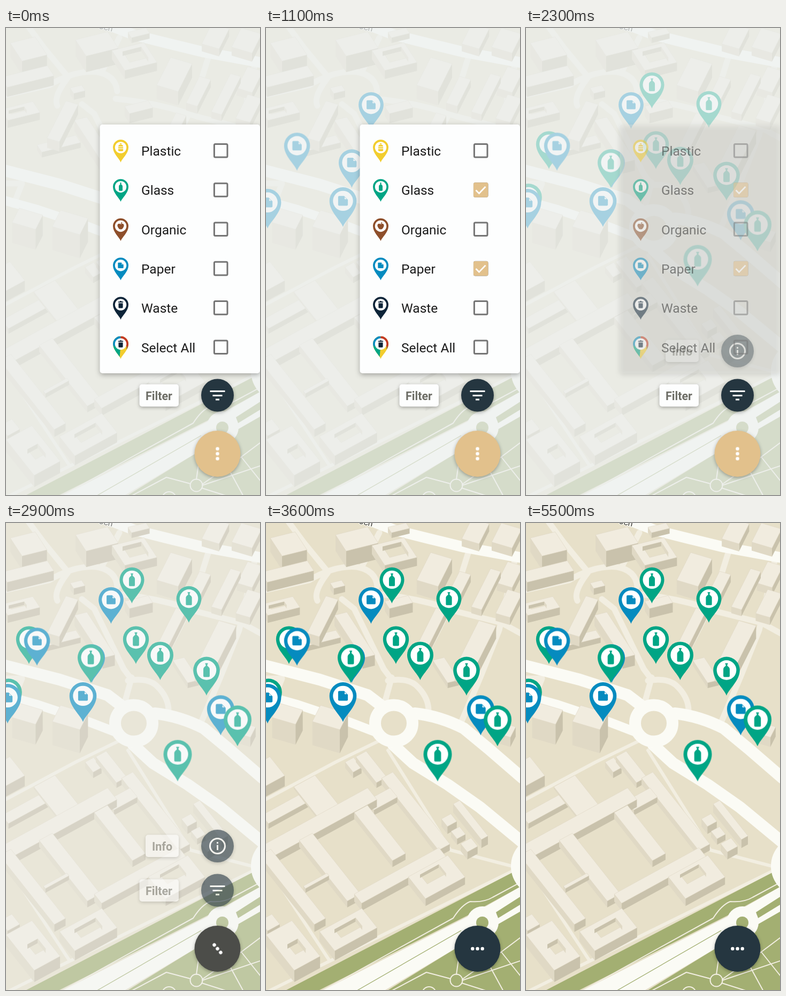
An HTML page that plays this animation: 475x871 px, repeating every 5600 ms.

```html
<!DOCTYPE html>
<html lang="en">
<head>
<meta charset="utf-8">
<title>Map filter menu</title>
<style>
  html, body { margin: 0; width: 100%; height: 100%; overflow: hidden; background: #e7e0c9; }
  svg { display: block; width: 475px; height: 871px; font-family: Roboto, "Liberation Sans", sans-serif; }
  .anim, .anim * { animation-duration: 5600ms; animation-iteration-count: infinite; animation-timing-function: linear; }
  .road { fill: none; stroke-linejoin: round; stroke-linecap: round; }
  .minor { stroke: #f2eee1; }
  .major { stroke: #fbfbf5; }
  .item { font-size: 24.5px; fill: #1c1c1c; }
  .tag { font-size: 21.5px; font-weight: 700; fill: #6d6d66; text-anchor: middle; }
  .raised { filter: drop-shadow(0 2px 3px rgba(0, 0, 0, .3)); }
  .dot { transform-box: view-box; transform-origin: 395.5px 794px; }

  #wash { fill: #ecf0f0; animation-name: wash; }
  @keyframes wash {
    0%, 48.21% { opacity: .7; }
    51.79% { opacity: .38; }
    53.57% { opacity: .21; }
    57.14% { opacity: .07; }
    62.5%, 100% { opacity: 0; }
  }
  #paperPins { animation-name: paperPins; }
  @keyframes paperPins { 0%, 14.29% { opacity: 0; } 17.86%, 100% { opacity: 1; } }
  #glassPins { animation-name: glassPins; }
  @keyframes glassPins { 0%, 21.43% { opacity: 0; } 26.79%, 100% { opacity: 1; } }

  #card { animation-name: card; }
  @keyframes card {
    0%, 37.5% { fill: #fdfefe; opacity: 1; }
    41.07% { fill: #e2e2dd; opacity: .35; }
    44.64%, 100% { fill: #e2e2dd; opacity: 0; }
  }
  #items { animation-name: items; }
  @keyframes items { 0%, 37.5% { opacity: 1; } 41.07% { opacity: .5; } 44.64%, 100% { opacity: 0; } }

  #paperOn, #glassOn { animation-timing-function: step-end; }
  #paperOn { animation-name: paperOn; }
  @keyframes paperOn { 0% { opacity: 0; } 7.14%, 100% { opacity: 1; } }
  #glassOn { animation-name: glassOn; }
  @keyframes glassOn { 0% { opacity: 0; } 14.29%, 100% { opacity: 1; } }

  .ripple { fill: #000; }
  #paperRipple { animation-name: paperRipple; }
  @keyframes paperRipple {
    0%, 3.56% { r: 0px; opacity: 0; }
    3.57% { r: 30px; opacity: .07; }
    7.14% { r: 170px; opacity: .07; }
    10.71%, 100% { r: 230px; opacity: 0; }
  }
  #glassRipple { animation-name: glassRipple; }
  @keyframes glassRipple {
    0%, 10.7% { r: 0px; opacity: 0; }
    10.71% { r: 30px; opacity: .07; }
    12.5% { r: 92.3px; opacity: .07; }
    16.07% { r: 200px; opacity: .05; }
    17.86%, 100% { r: 230px; opacity: 0; }
  }

  #info { animation-name: info; }
  @keyframes info { 0%, 37.5% { opacity: 0; } 41.07% { opacity: .58; } 44.64%, 100% { opacity: 1; } }
  .mini { animation-name: mini; }
  @keyframes mini { 0%, 48.21% { opacity: 1; } 53.57% { opacity: .42; } 57.14%, 100% { opacity: 0; } }
  .label { animation-name: label; }
  @keyframes label { 0%, 48.21% { opacity: 1; } 53.57% { opacity: .3; } 57.14%, 100% { opacity: 0; } }

  #fab { animation-name: fab; }
  @keyframes fab {
    0%, 48.21% { fill: #e2c18c; }
    51.79% { fill: #4c4d49; }
    53.57% { fill: #1b2830; }
    64.29%, 100% { fill: #253640; }
  }
  .dot { animation-name: dots; }
  @keyframes dots {
    0%, 48.21% { transform: rotate(90deg); }
    53.57% { transform: rotate(30deg); }
    57.14%, 100% { transform: rotate(0deg); }
  }
</style>
</head>
<body>
<svg class="anim" viewBox="0 0 475 871">
  <defs>
    <path id="drop" d="M0 48C-4 36-25 20-25 0A25 25 0 1 1 25 0C25 20 4 36 0 48Z"/>
    <clipPath id="dropClip"><use href="#drop"/></clipPath>
    <path id="glass" d="M-2.5-13h5v2h-1v3q4.5 3 4.5 6v13q0 2-2 2h-8q-2 0-2-2v-13q0-3 4.5-6v-3h-1z"/>
    <path id="paper" d="M-9-7q0-2 2-2h9l7 7v9q0 2-2 2h-14q-2 0-2-2zM3-7v4h4z" fill-rule="evenodd"/>
    <path id="waste" d="M-8-10h5l1-2h4l1 2h5v3h-16zM-7-5h14v14q0 2-2 2h-10q-2 0-2-2z"/>
    <path id="organic" d="M0-6c8-5 12 1 10 7s-6 11-10 9c-4 2-8-3-10-9s2-12 10-7zM0-7q0-5 5-6q0 5-5 6z"/>
    <path id="plastic" d="M-3-13h6v3h-6zM-4-9h8q4 2 4 6h-16q0-4 4-6zM-8-1h16v4h-16zM-8 5h16v4q0 3-3 3h-10q-3 0-3-3z"/>
    <clipPath id="glassRow"><rect x="176" y="265" width="299" height="73.4"/></clipPath>
    <clipPath id="paperRow"><rect x="176" y="412" width="299" height="73.4"/></clipPath>
  </defs>

  <rect width="475" height="871" fill="#e7e0c9"/>
  <g class="road minor" stroke-width="11">
    <path d="M40-5L72 38L113 88M-5 126L80 107Q130 78 170 82Q205 88 208 118M96 145Q88 128 116 92M178 84L212 18"/>
    <path d="M142 142L165 160L220 272L235 292M235 288L222 335M228 294Q262 288 280 302Q304 324 304 350"/>
    <path d="M364 374L402 285L436 200L466 66M205 132Q290 140 360 166L440 186L480 208M296 250L350 145L378 56"/>
    <path d="M-5 290L30 290L14 330"/>
  </g>
  <g class="road minor" stroke-width="6">
    <path d="M-5 518L130 446L212 406M-5 878L480 640M228 424L345 610L460 640M8 648L118 815"/>
  </g>
  <g fill="#a3af72">
    <path d="M38 871L480 642V676L385 728L100 871Z"/>
    <path d="M222 875L352 795L480 722V875Z"/>
  </g>
  <g class="road minor" stroke-width="2">
    <path d="M106 872L250 792L350 737Q366 712 382 706Q408 708 424 698L480 668"/>
    <path d="M230 875L300 838L345 850M367 851L440 800L480 770M366 858L420 875M356 842L362 800M367 853L480 815M415 820L445 875M440 800L480 850"/>
    <circle cx="356" cy="853" r="11.5"/><circle cx="305" cy="878" r="13"/>
  </g>
  <path d="M100 875L385 730L480 676V722L352 795L216 875Z" fill="#fbfbf5"/>
  <path d="M165 875L365 760" stroke="#a3af72" stroke-width="1.3"/>
  <path d="M430 726L480 694V709L434 737Z" fill="#a3af72"/>
  <circle cx="405" cy="745" r="30" fill="#fbfbf5"/><circle cx="404.500" cy="745.500" r="11.500" fill="#a3af72"/>
  <circle cx="515" cy="640" r="57" fill="#fbfbf5"/>
  <g class="road major">
    <path stroke-width="20" d="M185-8L240 13L300 28L370 45L480 65"/>
    <path stroke-width="22" d="M-5 265L100 292L190 321L215 340M278 355Q325 360 370 383L415 420L480 476M238 414L275 448L340 488L400 530L480 596"/>
    <path stroke-width="17" d="M-5 321L60 339L150 369L205 390"/>
    <ellipse cx="239" cy="373.500" rx="35" ry="34" stroke-width="22"/>
  </g>
  <g id="city"></g>
  <text transform="translate(173 1) rotate(12)" font-size="16" fill="#3c3a34" stroke="#fbfbf5" stroke-width="2.500" paint-order="stroke">och</text>

  <g id="pins"><g id="paperPins"></g><g id="glassPins"></g></g>
  <rect id="wash" width="475" height="871"/>

  <g id="info">
    <g class="label">
      <rect class="raised" x="261" y="581.500" width="62" height="41.500" rx="5" fill="#fdfefe"/>
      <text class="tag" x="292" y="610.500">Info</text>
    </g>
    <g class="mini">
      <circle class="raised" cx="395.500" cy="602.500" r="30.500" fill="#253640"/>
      <g fill="none" stroke="#fff" stroke-width="3">
        <circle cx="395.500" cy="602.500" r="14"/><path d="M395.500 600.500v9.500M395.500 595v3"/>
      </g>
    </g>
  </g>
  <g class="label">
    <rect class="raised" x="249.500" y="664.500" width="73.500" height="41.500" rx="5" fill="#fdfefe"/>
    <text class="tag" x="286" y="693.500">Filter</text>
  </g>
  <g class="mini">
    <circle class="raised" cx="395.500" cy="685" r="30.500" fill="#253640"/>
    <path d="M381.500 677.500h28M386.500 685.500h18M392 693h7" stroke="#fff" stroke-width="3"/>
  </g>
  <circle id="fab" class="raised" cx="395.500" cy="794" r="43"/>
  <g class="dot" fill="#fff">
    <circle cx="386.300" cy="794" r="3.200"/><circle cx="395.500" cy="794" r="3.200"/><circle cx="404.700" cy="794" r="3.200"/>
  </g>

  <g style="filter:drop-shadow(0 3px 5px rgba(0,0,0,.3))">
    <rect id="card" x="175.500" y="180" width="299.500" height="464" rx="5"/>
  </g>
  <g id="items">
    <g id="rows"></g>
    <g clip-path="url(#paperRow)"><circle id="paperRipple" class="ripple" cx="350" cy="452"/></g>
    <g clip-path="url(#glassRow)"><circle id="glassRipple" class="ripple" cx="350" cy="350"/></g>
  </g>
</svg>

<script>
const el = id => document.getElementById(id);
const colours = { plastic: '#f2cd2e', glass: '#00a585', organic: '#8e4f2b', paper: '#058bbf', waste: '#0d2438' };

// Extruded block: corner, width, depth, height. A negative height sinks a courtyard.
function block([ux, uy, vx, vy], [x, y, w, d, h]) {
  const c = [[x, y], [x + w * ux, y + w * uy], [x + w * ux + d * vx, y + w * uy + d * vy], [x + d * vx, y + d * vy]];
  const side = Math.sign(h), drop = Math.abs(h);
  const walls = c.map((a, i) => {
    const b = c[(i + 1) % 4];
    if ((b[0] - a[0]) * side >= 0) return '';
    const fill = (b[1] - a[1]) * side > 0 ? '#c9c2ac' : '#e0d9c5';
    return `<path d="M${a}L${b}v${drop}L${a[0]},${a[1] + drop}Z" fill="${fill}"/>`;
  }).join('');
  const top = `<path d="M${c.join('L')}Z" fill="${h > 0 ? '#f1ecdf' : '#e7e0c9'}" stroke="#ddd6c3" stroke-width=".6"/>`;
  return h > 0 ? walls + top : top + walls;
}
const district = (axes, blocks) => { el('city').innerHTML += blocks.map(b => block(axes, b)).join(''); };

district([.97, -.24, .55, .84], [
  [228, 8, 35, 12, 10], [8, 28, 48, 40, 26], [130, 22, 62, 36, 30],
  [198, 42, 62, 44, 16], [218, 44, 36, 24, -8], [-10, 92, 90, 22, 18],
  [120, 112, 22, 12, 12], [-10, 152, 62, 24, 14], [5, 154, 30, 8, -6],
  [222, 146, 45, 16, 18], [128, 172, 24, 95, 20], [58, 218, 75, 16, 10], [312, 256, 22, 50, 10]
]);
district([.95, .28, -.45, .89], [
  [385, -8, 34, 42, 14], [440, 0, 40, 40, 16], [308, 55, 42, 58, 26], [452, 72, 30, 45, 14],
  [420, 85, 20, 80, 12], [362, 90, 22, 56, 14], [452, 124, 28, 50, 14], [112, 136, 24, 78, 18],
  [318, 158, 20, 85, 16], [398, 182, 34, 100, 24], [25, 336, 46, 30, 38],
  [102, 340, 54, 34, 44], [446, 374, 22, 22, 18]
]);
district([.88, -.48, .62, .78], [
  [-28, 455, 40, 45, 20], [148, 446, 18, 24, 11], [168, 436, 22, 62, 10], [216, 476, 24, 172, 12],
  [-8, 545, 85, 20, 10], [52, 492, 45, 80, 4], [188, 518, 50, 22, 10], [-8, 602, 225, 28, 14],
  [165, 540, 28, 115, 12], [62, 592, 28, 145, 12], [70, 677, 50, 6, 8], [-12, 620, 24, 165, 14],
  [165, 692, 180, 22, 14], [266, 660, 84, 52, 14], [288, 656, 40, 22, -6],
  [100, 762, 90, 46, 18], [128, 758, 45, 20, -7], [-12, 742, 26, 24, 14],
  [0, 768, 55, 85, 22], [40, 786, 22, 24, -8],
  [350, 524, 14, 85, 16], [328, 552, 20, 18, 14], [346, 575, 18, 18, 11], [364, 598, 22, 20, 14]
]);

function pin(kind, x, tip, width) {
  const k = width / 50;
  const body = kind === 'all'
    ? `<g clip-path="url(#dropClip)"><rect x="-25" y="-25" width="50" height="75" fill="#f2cd2e"/>
       <path d="M0 0L-30 10V-30H0Z" fill="#058bbf"/><path d="M0 0V-30H30V12Z" fill="#c33a24"/>
       <path d="M0 0L-30 10V50H-4Z" fill="#00a585"/><path d="M19 8l6 1-6 9z" fill="#8e4f2b"/></g>`
    : `<use href="#drop" fill="${colours[kind]}"/>`;
  const icon = kind === 'all' ? 'waste' : kind;
  return `<g transform="translate(${x} ${tip - 48 * k}) scale(${k})">${body}
    <circle r="18.500" fill="#fff"/><use href="#${icon}" fill="${colours[icon]}"/></g>`;
}

// Pins grow toward the viewer, i.e. down the stage.
const mapPins = (kind, spots) => spots.map(([x, tip]) => pin(kind, x, tip, 46 + (tip - 150) * .021)).join('');
el('glassPins').innerHTML = mapPins('glass', [
  [235.5, 150], [342, 186], [243, 263], [288.5, 293], [158.500, 298], [375, 322], [433, 416], [321, 482]
]);
el('paperPins').innerHTML = mapPins('paper', [[196.500, 188], [160.500, 298]]);

// Pairs standing close together: the glass pin is behind the paper one.
const addFront = (kind, group, spots) => {
  const g = el(group).cloneNode(false);
  g.id = '';
  g.style.animationName = group;
  g.innerHTML = mapPins(kind, spots);
  el('pins').append(g);
};
addFront('glass', 'glassPins', [[43, 263], [4.500, 364]]);
addFront('paper', 'paperPins', [[58, 266], [144, 371], [3, 374], [401.500, 396]]);
addFront('glass', 'glassPins', [[433, 416]]);

const names = ['Plastic', 'Glass', 'Organic', 'Paper', 'Waste', 'Select All'];
el('rows').innerHTML = names.map((name, i) => {
  const y = 228.7 + i * 73.3;
  const kind = i === 5 ? 'all' : name.toLowerCase();
  const on = kind === 'glass' || kind === 'paper'
    ? `<g id="${kind}On"><rect x="388" y="${y - 13.7}" width="27.400" height="27.400" rx="3" fill="#e2c18c"/>
       <path d="M392.500 ${y + .5}l6 6l12-12.500" fill="none" stroke="#fff" stroke-width="2.800"/></g>`
    : '';
  return pin(kind, 214.5, y + 22, 29) +
    `<text class="item" x="253" y="${y + 9.3}">${name}</text>
     <rect x="389.400" y="${y - 12.3}" width="24.600" height="24.600" rx="2" fill="none" stroke="#757575" stroke-width="3"/>` + on;
}).join('');
</script>
</body>
</html>
```
